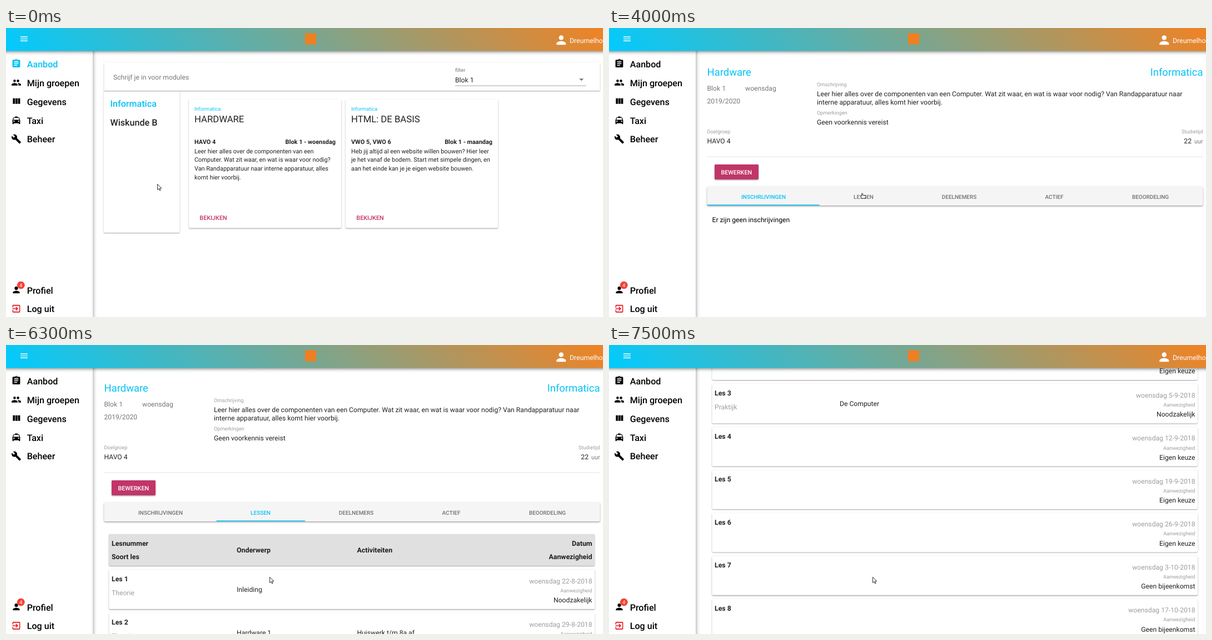
Animation, 1074 px wide and 521 px high, one loop 8 s. Source, as an HTML page with a canvas:

```html
<!DOCTYPE html>
<html lang="nl">
<head>
<meta charset="utf-8">
<title>Modules</title>
<style>
html, body { margin: 0; width: 100%; height: 100%; overflow: hidden; background: #fff; }
canvas { display: block; width: 1074px; height: 521px; }
</style>
</head>
<body>
<canvas id="stage"></canvas>
<script>
const W = 1074, H = 521, LOOP = 8000;
const canvas = document.getElementById('stage');
const ctx = canvas.getContext('2d');
const dpr = window.devicePixelRatio || 1;
canvas.width = W * dpr;
canvas.height = H * dpr;

const CYAN = '#05c3f7', PINK = '#c13568', RED = '#f44336';
const INK = 'rgba(0,0,0,.87)', SOFT = 'rgba(0,0,0,.54)', FAINT = 'rgba(0,0,0,.39)';
const BODY = 12.17, SMALL = 9.2, TITLE = 16.1, HEAD = 18.45, BOLD = 12.35;

const circle = (x, y, r) => `M${x - r} ${y}a${r} ${r} 0 1 0 ${2 * r} 0a${r} ${r} 0 1 0-${2 * r} 0z`;
const icon = {
  menu: new Path2D('M3 6h18v2H3zM3 11h18v2H3zM3 16h18v2H3z'),
  list: new Path2D('M5 3h4.2a3 3 0 0 1 5.6 0H19a2 2 0 0 1 2 2v14a2 2 0 0 1-2 2H5a2 2 0 0 1-2-2V5a2 2 0 0 1 2-2z' +
    circle(12, 4, 1) + 'M7 7v2h10V7zm0 4v2h10v-2zm0 4v2h7v-2z'),
  group: new Path2D(circle(8, 8, 3) + circle(16, 8, 3) +
    'M1 19v-2.5C1 14.2 5.7 13 8 13s7 1.2 7 3.5V19zM17 19v-2.5c0-1.5-.8-2.6-2-3.4c3-.4 8 1 8 3.4V19z'),
  columns: new Path2D('M4 5h5v13H4zM10 5h5v13h-5zM16 5h5v13h-5z'),
  taxi: new Path2D('M3 12l2.1-6A1.5 1.5 0 0 1 6.5 5H9V3h6v2h2.5a1.5 1.5 0 0 1 1.4 1L21 12v8a1 1 0 0 1-1 1h-1' +
    'a1 1 0 0 1-1-1v-1H6v1a1 1 0 0 1-1 1H4a1 1 0 0 1-1-1zM5 11h14l-1.5-4.5h-11z' +
    circle(6.5, 14.5, 1.5) + circle(17.5, 14.5, 1.5)),
  wrench: new Path2D('M22.7 19l-9.1-9.1c.9-2.3.4-5-1.5-6.9-2-2-5-2.4-7.4-1.3L9 6 6 9 1.6 4.7C.4 7.1.9 10.1 2.9 12.1' +
    'c1.9 1.9 4.6 2.4 6.9 1.5l9.1 9.1c.4.4 1 .4 1.4 0l2.3-2.3c.5-.4.5-1.1.1-1.4z'),
  person: new Path2D(circle(12, 8, 4) + 'M4 20v-2c0-2.7 5.3-4 8-4s8 1.3 8 4v2z'),
  exit: new Path2D('M10.1 15.6l1.4 1.4 5-5-5-5-1.4 1.4 2.6 2.6H3v2h9.7z' +
    'M3 9V5a2 2 0 0 1 2-2h14a2 2 0 0 1 2 2v14a2 2 0 0 1-2 2H5a2 2 0 0 1-2-2v-4h2v4h14V5H5v4z')
};
const arrow = new Path2D('M.5.5v10.2l2.4-2.2 1.6 3.6 1.6-.7-1.6-3.5h3.3z');
const hand = new Path2D('M2.7 5.4V1.4a.9.9 0 0 1 1.8 0V4l4.4.6a1.3 1.3 0 0 1 1.1 1.3l-.5 3.6H3.2L.8 6.6a.8.8 0 0 1 1-1.2z');

const menu = [
  ['list', 'Aanbod', 64.5], ['group', 'Mijn groepen', 98.7], ['columns', 'Gegevens', 132.5],
  ['taxi', 'Taxi', 166.6], ['wrench', 'Beheer', 200.4], ['person', 'Profiel', 472.5], ['exit', 'Log uit', 506.3]
];
const cards = [
  { x: 329, title: 'HARDWARE', level: 'HAVO 4', when: 'Blok 1 - woensdag', lines: [
    'Leer hier alles over de componenten van een', 'Computer. Wat zit waar, en wat is waar voor nodig?',
    'Van Randapparatuur naar interne apparatuur, alles', 'komt hier voorbij.'] },
  { x: 611, title: 'HTML: DE BASIS', level: 'VWO 5, VWO 6', when: 'Blok 1 - maandag', lines: [
    'Heb jij altijd al een website willen bouwen? Hier leer', 'je het vanaf de bodem. Start met simpele dingen, en',
    'aan het einde kan je je eigen website bouwen.'] }
];
const tabs = [['INSCHRIJVINGEN', 278], ['LESSEN', 458], ['DEELNEMERS', 630], ['ACTIEF', 801], ['BEOORDELING', 974]];
const lessons = [
  ['22-8-2018', 'Noodzakelijk', 'Theorie', 'Inleiding'],
  ['29-8-2018', 'Eigen keuze', 'Theorie', 'Hardware 1', 'Huiswerk t/m 8a af'],
  ['5-9-2018', 'Noodzakelijk', 'Praktijk', 'De Computer'],
  ['12-9-2018', 'Eigen keuze'], ['19-9-2018', 'Eigen keuze'], ['26-9-2018', 'Eigen keuze'],
  ['3-10-2018', 'Geen bijeenkomst'], ['17-10-2018', 'Geen bijeenkomst']
];

// y is the middle of the capitals
function text(str, x, y, size, color = INK, weight = 400, align = 'left') {
  ctx.font = `${weight} ${size}px Roboto, sans-serif`;
  ctx.textAlign = align;
  ctx.fillStyle = color;
  ctx.fillText(str, x, y + size * 0.355);
}

function rect(x, y, w, h, color) {
  ctx.fillStyle = color;
  ctx.fillRect(x, y, w, h);
}

function paper(x, y, w, h, fill = '#fff', lift = 1) {
  ctx.save();
  ctx.fillStyle = fill;
  ctx.beginPath();
  ctx.roundRect(x, y, w, h, 2);
  for (const [dy, blur, alpha] of [[0.8, 2.6, 0.22], [1, 1.3, 0.2]]) {
    ctx.shadowColor = `rgba(0,0,0,${alpha})`;
    ctx.shadowOffsetY = dy * lift * dpr;
    ctx.shadowBlur = blur * lift * dpr;
    ctx.fill();
  }
  ctx.restore();
}

function drawIcon(name, x, y, color, scale = 0.767) {
  ctx.save();
  ctx.translate(x, y);
  ctx.scale(scale, scale);
  ctx.translate(-12, -12);
  ctx.fillStyle = color;
  ctx.fill(icon[name], 'evenodd');
  ctx.restore();
}

// last entry that has started: [time, ...values]
const latest = (list, t) => list.reduce((found, entry) => (t >= entry[0] ? entry : found));

function cursorAt(t) {
  const glide = (start, count, x0, y0, x1, y1) => {
    const p = Math.min(count, Math.floor((t - start) / 100) + 1) / count;
    return { x: x0 + (x1 - x0) * p, y: y0 + (y1 - y0) * p };
  };
  if (t < 700) return { x: 272, y: 281 };
  let pos;
  if (t < 1600) pos = glide(700, 9, 272, 281, 365, 184);
  else if (t < 2500) pos = glide(1600, 4, 365, 184, 383, 161);
  else {
    const [, x, y] = latest([[2500, 384, 160.5], [4000, 452, 297.5], [5200, 446, 298],
      [5400, 445.5, 298], [5700, 470, 403], [6000, 474, 418]], t);
    pos = { x, y };
  }
  pos.hand = pos.x >= 329 && t < 5700;
  return pos;
}

const scrollAt = t => latest([[0, 0], [6300, 2], [6700, 285], [7100, 390], [7500, 493]], t)[1];

function drawOffer(cursor) {
  paper(176, 113, 136.5, 256);
  paper(176.5, 62, 892, 51);
  text('Schrijf je in voor modules', 193, 88.3, BODY, SOFT);
  text('filter', 808, 76.2, SMALL, SOFT);
  text('Blok 1', 808, 93.3, BODY);
  rect(808, 103.7, 235.5, 0.8, 'rgba(0,0,0,.45)');
  ctx.fillStyle = SOFT;
  ctx.fill(new Path2D('M1031.2 91.3h8l-4 4z'));
  text('Informatica', 187.5, 136.3, TITLE, CYAN, 500);
  text('Wiskunde B', 187.5, 170.3, TITLE, INK, 500);
  for (const { x, title, level, when, lines } of cards) {
    const hover = x === 329 && cursor.x >= 329;
    paper(x, 129, 274, 231.5, '#fff', hover ? 1.5 : 1.15);
    text('Informatica', x + 10, 146.2, SMALL, CYAN);
    text(title, x + 10, 164.3, 16.7);
    text(level, x + 10, 205.6, 10.9, INK, 700);
    text(when, x + 264, 204.8, 10.9, INK, 700, 'right');
    lines.forEach((line, i) => text(line, x + 10, 221.8 + i * 15.75, 10.87));
    text('BEKIJKEN', x + 44, 342.2, 10.8, PINK, 500, 'center');
  }
}

function drawLessons(cursor, scroll) {
  paper(185, 343, 874, 57, '#e0e0e0');
  text('Lesnummer', 190, 360, BOLD, INK, 700);
  text('Soort les', 190, 383.5, BOLD, INK, 700);
  text('Onderwerp', 415, 371.8, BOLD, INK, 700);
  text('Activiteiten', 631.5, 371.8, BOLD, INK, 700);
  text('Datum', 1054.5, 360, BOLD, INK, 700, 'right');
  text('Aanwezigheid', 1054.5, 383.5, BOLD, INK, 700, 'right');
  let y = 407;
  lessons.forEach(([date, presence, type, topic, work], i) => {
    const h = type ? 71 : 70.3, pull = type ? 0 : 0.5;
    const mouse = cursor.y + scroll;
    paper(185.5, y, 873.5, h, '#fff', mouse >= y && mouse < y + h ? 1.35 : 1);
    text(`Les ${i + 1}`, 190, y + 16.4, BOLD, INK, 700);
    if (type) text(type, 190, y + 41.3, BODY, FAINT);
    if (topic) text(topic, 415, y + 35.2, BODY);
    if (work) text(work, 631.5, y + 35.2, BODY);
    text(`woensdag ${date}`, 1054.5, y + 20.2 - pull, BODY, FAINT, 400, 'right');
    text('Aanwezigheid', 1054.5, y + 37.5 - pull, SMALL, FAINT, 400, 'right');
    text(presence, 1054.5, y + 54.8 - pull, BODY, INK, 400, 'right');
    y += h + 7.1;
  });
}

function drawTabs(t) {
  const active = t < 4800 ? 0 : 1;
  paper(176.5, 286, 892, 34, '#f5f5f5', 1.5);
  if (t >= 4300 && t < 4800) {
    ctx.save();
    ctx.beginPath();
    ctx.rect(378, 286, 160, 34);
    ctx.clip();
    ctx.fillStyle = 'rgba(0,0,0,.12)';
    ctx.fill(new Path2D(circle(454.5, 303, 64.5)));
    ctx.restore();
  }
  tabs.forEach(([label, x], i) => text(label, x, 304.1, 9.97, i === active ? CYAN : SOFT, 500, 'center'));
  if (t < 5200) rect(176.5, 318.4, 202, 1.6, CYAN);
  else rect(378.5, 318.4, 159.5, 1.6, CYAN);
}

function drawModule(t, cursor) {
  const scroll = scrollAt(t);
  ctx.save();
  ctx.translate(0, -scroll);
  text('Hardware', 176.5, 79.3, HEAD, CYAN);
  text('Informatica', 1068.5, 79.3, HEAD, CYAN, 400, 'right');
  text('Blok 1', 176.5, 108.3, BODY, SOFT);
  text('woensdag', 245, 108.3, BODY, SOFT);
  text('2019/2020', 176.5, 131.7, BODY, SOFT);
  text('Omschrijving', 374, 102.2, SMALL, FAINT);
  text('Leer hier alles over de componenten van een Computer. Wat zit waar, en wat is waar voor nodig? Van Randapparatuur naar', 374, 119, BODY);
  text('interne apparatuur, alles komt hier voorbij.', 374, 134, BODY);
  text('Opmerkingen', 374, 152.3, SMALL, FAINT);
  text('Geen voorkennis vereist', 374, 169.3, BODY);
  text('Doelgroep', 176.5, 186.4, SMALL, FAINT);
  text('HAVO 4', 176.5, 203.5, BODY);
  text('Studietijd', 1068.5, 186.4, SMALL, FAINT, 400, 'right');
  text('22', 1048, 203.5, BODY, INK, 400, 'right');
  text('uur', 1068.5, 203.8, 10.7, SOFT, 400, 'right');
  rect(176.5, 231.5, 892, 0.9, 'rgba(0,0,0,.13)');
  paper(190, 246, 79, 26.8, PINK, 1.4);
  text('BEWERKEN', 229.3, 260, 10.75, '#fff', 500, 'center');
  drawTabs(t);
  if (t < 4800) text('Er zijn geen inschrijvingen', 185.5, 345.2, BODY, '#000');
  if (t >= 5200) drawLessons(cursor, scroll);
  ctx.restore();
}

function drawSidebar(t) {
  ctx.save();
  ctx.shadowColor = 'rgba(0,0,0,.42)';
  ctx.shadowBlur = 7 * dpr;
  ctx.shadowOffsetX = 0.5 * dpr;
  rect(-20, 0, 176, H + 20, '#fff');
  ctx.restore();
  for (const [name, label, y] of menu) {
    const color = name === 'list' && t < 4000 ? CYAN : '#000';
    drawIcon(name, 18.5, y - 0.3, name === 'exit' ? '#e5141f' : color);
    text(label, 37.7, y + 0.3, TITLE, color, 500);
  }
  ctx.fillStyle = RED;
  ctx.fill(new Path2D(circle(26.8, 463.6, 6.9)));
  text('4', 26.8, 463.7, 9, '#fff', 400, 'center');
}

function drawHeader() {
  const bar = ctx.createLinearGradient(264, 305, 832, -263);
  bar.addColorStop(0, '#00cbff');
  bar.addColorStop(1, '#f48120');
  ctx.save();
  ctx.shadowColor = 'rgba(0,0,0,.5)';
  ctx.shadowBlur = 6 * dpr;
  ctx.shadowOffsetY = 1.5 * dpr;
  rect(-20, -20, W + 40, 61.5, bar);
  ctx.restore();
  drawIcon('menu', 32.4, 19.6, '#fff', 0.72);
  rect(538, 9.5, 20, 20, '#ee8022');
  drawIcon('person', 998.8, 21.7, '#fff', 1.06);
  text('Dreumelhof', 1014, 22.7, 12.3, '#fff');
}

function drawCursor({ x, y, hand: pointing }) {
  ctx.save();
  ctx.translate(x, y);
  ctx.fillStyle = '#fff';
  ctx.strokeStyle = '#1c1c1c';
  ctx.lineWidth = 0.9;
  ctx.lineJoin = 'round';
  const shape = pointing ? hand : arrow;
  ctx.fill(shape);
  ctx.stroke(shape);
  ctx.restore();
}

function draw(t) {
  const cursor = cursorAt(t);
  ctx.setTransform(dpr, 0, 0, dpr, 0, 0);
  ctx.textRendering = 'geometricPrecision';
  rect(0, 0, W, H, '#fff');
  if (t < 4000) drawOffer(cursor);
  else drawModule(t, cursor);
  drawSidebar(t);
  drawHeader();
  drawCursor(cursor);
}

const start = performance.now();
function tick() {
  draw((performance.now() - start) % LOOP);
  requestAnimationFrame(tick);
}
tick();
</script>
</body>
</html>
```
